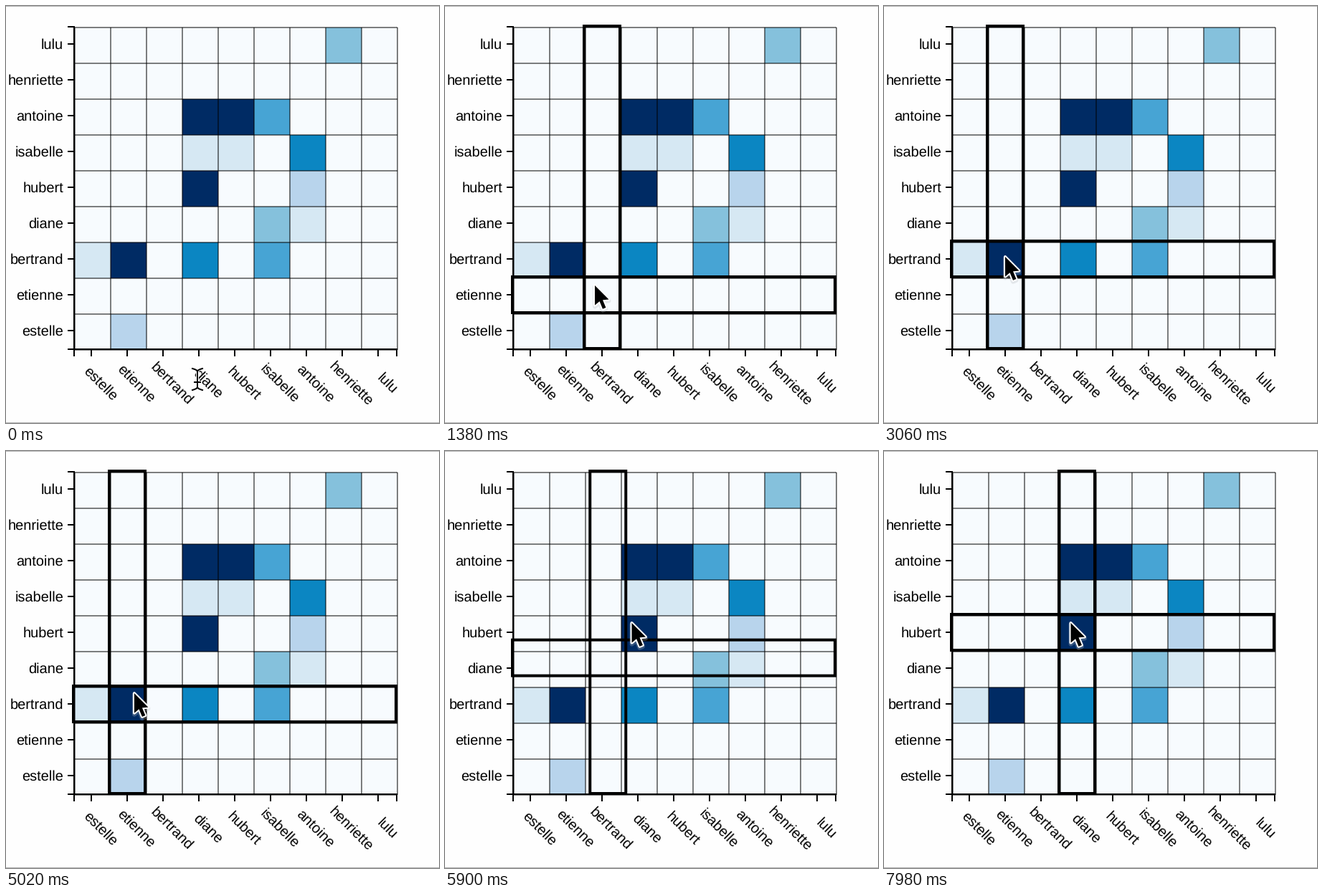
A matplotlib script that plays this animation: 604 by 582 pixels, repeating every 8 s.

```python
import numpy as np
import matplotlib as mpl
import matplotlib.pyplot as plt
from matplotlib.animation import FuncAnimation
from matplotlib.collections import LineCollection
from matplotlib.patches import Polygon, Rectangle

W, H, DPI = 604, 582, 64
PT = 72 / DPI                      # points per pixel
STEP, LOOP = 20, 8000              # ms
X0, Y0, CELL, N = 94, 28, 50, 9    # matrix origin, cell size and count
SIDE = CELL * N
PAPER = "#fefefe"

NAMES = ["estelle", "etienne", "bertrand", "diane", "hubert",
         "isabelle", "antoine", "henriette", "lulu"]
SHADES = ["#d6e8f3", "#b8d4ec", "#85c1dc", "#47a4d4", "#0b86c2", "#002b64"]
# row from the top: {column: shade}
LINKS = {0: {7: 2}, 2: {3: 5, 4: 5, 5: 3}, 3: {3: 0, 4: 0, 6: 4},
         4: {3: 5, 6: 1}, 5: {5: 2, 6: 0}, 6: {0: 0, 1: 5, 3: 4, 5: 3},
         8: {1: 1}}

# pointer start, then its moves: (start, duration, goal)
HOME = (267, 521)
MOVES = [(420, 940, (209, 390)), (1500, 260, (169, 350)),
         (4870, 734, (260.5, 240))]
LABEL_Y = 500          # over the labels the pointer is a text caret
SHOW_AT = 1020         # row and column frames appear
GLIDE = 1370           # length of a frame move

mpl.rcParams["font.family"] = "Liberation Sans"
mpl.rcParams["text.hinting"] = "none"

fig = plt.figure(figsize=(W / DPI, H / DPI), dpi=DPI, facecolor=PAPER)
ax = fig.add_axes([0, 0, 1, 1])
ax.set(xlim=(0, W), ylim=(H, 0))
ax.axis("off")


def lines(segs, color, width, z):
    ax.add_collection(LineCollection(segs, colors=color, linewidths=width * PT,
                                     zorder=z, snap=False))


def box(x, y, w, h, z=1, **style):
    return ax.add_patch(Rectangle((x, y), w, h, zorder=z, snap=False, **style))


def draw_matrix():
    left, top = X0 + 2, Y0 + 2
    box(left, top, SIDE, SIDE, fc="#f7fbfe", lw=0)
    for row, cells in LINKS.items():
        for col, shade in cells.items():
            box(left + col * CELL, top + row * CELL, CELL, CELL,
                fc=SHADES[shade], lw=0)
    grid = []
    for k in range(N + 1):
        x, y = left + k * CELL, top + k * CELL
        grid += [[(x, top), (x, top + SIDE)], [(left, y), (left + SIDE, y)]]
    lines(grid, "black", 1, 2)


def draw_axes():
    x, y, end = X0 + 1, Y0 + SIDE + 1, X0 + SIDE + 1
    segs = [[(x, Y0), (x, y + 1)], [(x - 1, y), (end + 1, y)]]
    mids = [CELL * (k + 0.5) for k in range(N)]
    segs += [[(86, Y0 + m), (x, Y0 + m)] for m in mids + [1, SIDE + 1]]
    segs += [[(X0 + m, y), (X0 + m, 489)] for m in mids + [1, SIDE + 1]]
    lines(segs, "black", 2, 3)
    size = 20 * PT
    for m, name in zip(mids, NAMES):
        ax.text(80, Y0 + SIDE - m + 6.4, name, size=size,
                ha="right", va="baseline")
        ax.text(X0 + m + 8.5, 531, name, size=size, rotation=-45,
                rotation_mode="anchor", ha="center", va="baseline")


draw_matrix()
draw_axes()
lines([[(0, 0.5), (W, 0.5)], [(0, H - 0.5), (W, H - 0.5)]], "#b4b4b4", 1, 1)

frame_style = dict(z=5, fill=False, ec="black", lw=4 * PT, joinstyle="miter")
col_box = box(X0, Y0, CELL, SIDE, **frame_style)
row_box = box(X0, Y0, SIDE, CELL, **frame_style)


def arrow_shape():
    """Half an arrow (along, across) mirrored about its tilted axis."""
    half = np.array([(0, 0), (25.5, 10.5), (23, 2.4), (34.5, 2.4)])
    along, across = np.vstack([half, (half * (1, -1))[:0:-1]]).T
    c, s = np.cos(np.pi / 8), np.sin(np.pi / 8)
    return np.column_stack([s * along + c * across, c * along - s * across])


def caret_shape():
    """Curved feet, stem and crossbar, parted by gaps."""
    x = np.linspace(-7, 7, 15)
    foot = 11 + 4 * np.sqrt(np.abs(x) / 7)
    gap = [(np.nan, np.nan)]
    return np.vstack([np.column_stack([x, -foot]), gap, [(0, -11), (0, 11)],
                      gap, np.column_stack([x, foot]), gap, [(-4, 4), (4, 4)]])


ARROW, CARET = arrow_shape(), caret_shape()


def arrow_part(z, **style):
    return ax.add_patch(Polygon(ARROW, closed=True, zorder=z,
                                joinstyle="round", **style))


arrow = [
    (arrow_part(8, fc="none", ec="#b8bcc0", lw=6 * PT, alpha=0.3), (0, 2)),
    (arrow_part(9, fc="white", ec="white", lw=4 * PT), (0, 0)),
    (arrow_part(10, fc="black", lw=0), (0, 0)),
]
caret = [ax.plot([], [], color=c, lw=w * PT, zorder=z)[0]
         for c, w, z in ((PAPER, 4, 9), ("black", 2, 10))]


def progress(t, start, length):
    return min(max((t - start) / length, 0), 1)


def glide(t, start):
    """Cubic ease in and out."""
    p = progress(t, start, GLIDE)
    return 4 * p ** 3 if p < 0.5 else 1 - 4 * (1 - p) ** 3


def pointer(t):
    pos = np.array(HOME, float)
    for start, length, goal in MOVES:
        p = progress(t, start, length)
        pos += (goal - pos) * p * p * (3 - 2 * p)
    return pos


def update(i):
    t = i * STEP
    col = 2 - glide(t, 1640) + 2 * glide(t, 5175)
    row = 7 - glide(t, 1640) - 2 * glide(t, 5142)
    col_box.set_x(X0 + col * CELL)
    row_box.set_y(Y0 + row * CELL)
    for b in (col_box, row_box):
        b.set_visible(t >= SHOW_AT)

    pos = pointer(t)
    over_label = pos[1] > LABEL_Y
    for part, shift in arrow:
        part.set_xy(ARROW + pos + shift)
        part.set_visible(not over_label)
    for part in caret:
        part.set_data(*(CARET + pos).T)
        part.set_visible(over_label)
    return [col_box, row_box, *caret, *(part for part, _ in arrow)]


anim = FuncAnimation(fig, update, frames=LOOP // STEP, interval=STEP,
                     repeat=True, repeat_delay=0, blit=False)
plt.show()
```
